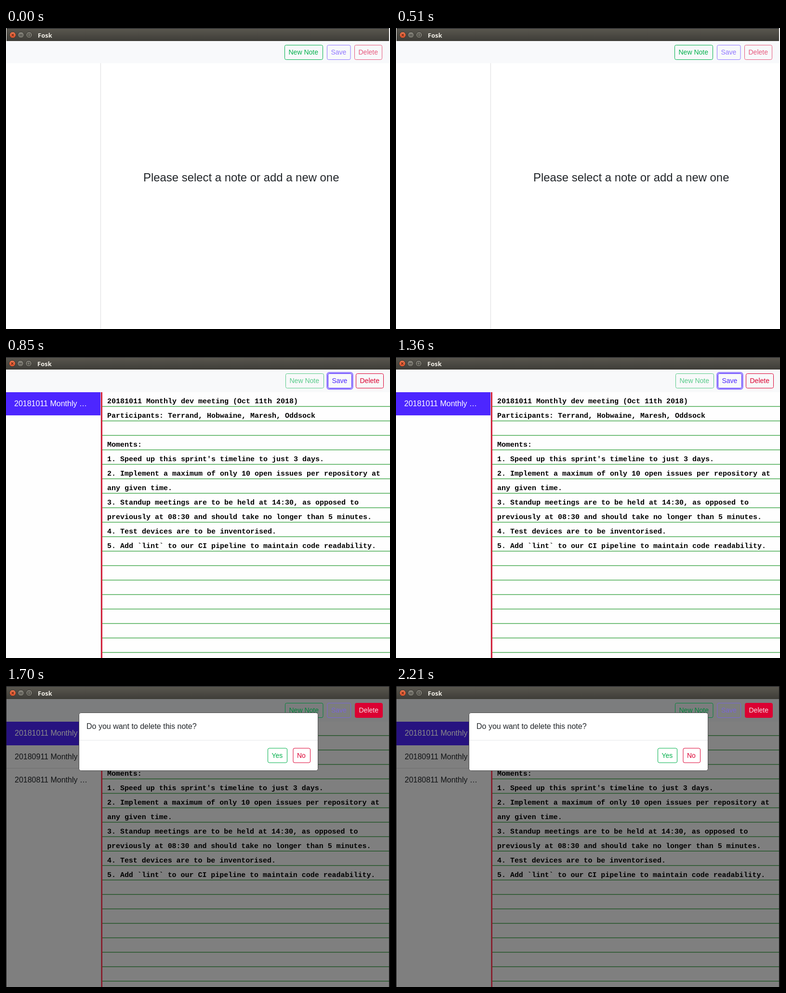
An HTML page for the animation above (2.55 s loop, 797 by 624 pixels).

```html
<!DOCTYPE html>
<html lang="en">
<head>
<meta charset="utf-8">
<title>Notes</title>
<style>
html, body { margin: 0; width: 100%; height: 100%; overflow: hidden; background: #fff; }
svg { display: block; width: 797px; height: 624px; }
text { font-family: "Liberation Sans", Arial, sans-serif; white-space: pre; }
.title { font: bold 13px "Open Sans", "Noto Sans", sans-serif; }
.note { font-family: "Liberation Mono", "Courier New", monospace; font-weight: bold; }
</style>
</head>
<body>
<svg id="stage" viewBox="0 0 797 624">
  <defs>
    <linearGradient id="bar" x2="0" y2="1">
      <stop stop-color="#5b5850"/><stop offset="1" stop-color="#3e3d38"/>
    </linearGradient>
    <linearGradient id="close" x2="0" y2="1">
      <stop stop-color="#f0794f"/><stop offset="1" stop-color="#dc4f29"/>
    </linearGradient>
    <linearGradient id="knob" x2="0" y2="1">
      <stop stop-color="#87857c"/><stop offset="1" stop-color="#6a6860"/>
    </linearGradient>
  </defs>
</svg>
<script>
const GREEN = '#00b04b', PURPLE = '#4d26ff', RED = '#dc0032', INK = '#212529';
const STEP = 850;

const NOTE = [
  '20181011 Monthly dev meeting (Oct 11th 2018)',
  'Participants: Terrand, Hobwaine, Maresh, Oddsock',
  '',
  'Moments:',
  "1. Speed up this sprint's timeline to just 3 days.",
  '2. Implement a maximum of only 10 open issues per repository at',
  'any given time.',
  '3. Standup meetings are to be held at 14:30, as opposed to',
  'previously at 08:30 and should take no longer than 5 minutes.',
  '4. Test devices are to be inventorised.',
  '5. Add `lint` to our CI pipeline to maintain code readability.'
];

const rect = (x, y, w, h, fill, more = '') =>
  `<rect x="${x}" y="${y}" width="${w}" height="${h}" fill="${fill}" ${more}/>`;

const text = (x, y, size, fill, str, cls = '') =>
  `<text x="${x}" y="${y}" font-size="${size}" fill="${fill}" class="${cls}">${str}</text>`;

const button = (x, y, w, label, color, fill = 'none', ink = color, pad = 8.5) =>
  rect(x + .5, y + .5, w - 1, 30, fill, `rx="3" stroke="${color}"`) +
  text(x + pad, y + 20, 14, ink, label);

function titleBar(x, y, right) {
  const cy = y - 12.5;
  const knob = (cx, fill) =>
    `<circle cx="${cx}" cy="${cy}" r="6.5" fill="${fill}" stroke="#33322d"/>`;
  const sign = (d, color) => `<path d="${d}" fill="none" stroke="${color}" stroke-width="1.2"/>`;
  const a = x + 13, b = x + 30, c = x + 47;
  return rect(x, 0, right - x, y, 'url(#bar)') +
    rect(x, 0, right - x, 1.4, '#24262a') +
    rect(x, y - 1, right - x, 1, '#3a3933') +
    knob(a, 'url(#close)') + knob(b, 'url(#knob)') + knob(c, 'url(#knob)') +
    sign(`M${a - 2.3} ${cy - 2.3}l4.6 4.6m0 -4.6l-4.6 4.6`, '#5c2413') +
    sign(`M${b - 3} ${cy}h6`, '#3b3a35') +
    sign(`M${c - 2.5} ${cy - 2.5}h5v5h-5z`, '#3b3a35') +
    text(x + 65, y - 7, 13, '#f1eee6', 'Fosk', 'title');
}

function paper(right, top, gap, size, line, margin, marginX) {
  let out = '';
  for (let i = 0; i < 18; i++)
    out += rect(200, top + i * gap, right - 200, 1.4, line);
  NOTE.forEach((s, i) => out += text(210, top - 5.8 + i * gap, size, '#000', s, 'note'));
  return out + rect(marginX, 73, 200 - marginX, 551, margin);
}

function emptyView() {
  return rect(0, 0, 797, 624, '#fff') +
    rect(1, 27, 794, 46, '#f8f9fb') + titleBar(1, 27, 795) +
    rect(196, 73, 1, 550, '#dcdddf') +
    button(578, 35, 80, 'New Note', GREEN) +
    button(666, 35, 49.5, 'Save', '#8f75ff') +
    button(723, 35, 58, 'Delete', '#e6587c') +
    text(285, 318, 23.9, INK, 'Please select a note or add a new one');
}

function noteView() {
  return rect(0, 0, 797, 624, '#fefefe') +
    rect(0, 26, 797, 47, '#f8f9fa') + titleBar(0, 26, 797) +
    rect(196, 73, 1, 551, '#d9dadc') +
    rect(0, 73, 196, 48, PURPLE) + text(17, 102, 16, '#fff', '20181011 Monthly …') +
    paper(797, 101.8, 30, 15, '#3fa749', '#d3233c', 197) +
    button(580, 34, 80, 'New Note', '#57cb89') +
    rect(666.5, 32.5, 53, 34, 'none', 'rx="4.5" stroke="#a08cff" stroke-width="3"') +
    button(668, 34, 50, 'Save', PURPLE) +
    button(726, 34, 58, 'Delete', RED);
}

function confirmView() {
  return rect(0, 0, 797, 624, '#7f7f7f') +
    rect(1, 27, 794, 47, '#7c7d7e') +
    rect(1, 74, 196, 49, '#271380') + rect(1, 170, 196, 1, '#6e6e6f') +
    rect(197, 74, 1, 550, '#6d6d6e') +
    text(18, 103, 16, '#8a8a8a', '20181011 Monthly …') +
    text(18, 151.5, 16, '#101214', '20180911 Monthly …') +
    text(18, 200, 16, '#101214', '20180811 Monthly …') +
    paper(795, 102, 29.95, 14.96, '#1f5425', '#8a1626', 197.5) +
    button(579, 35, 79.5, 'New Note', '#00843a') +
    button(666.5, 35, 49.5, 'Save', '#7a66d8') +
    button(724, 35, 58, 'Delete', RED, RED, '#f4e6e9') +
    rect(0, 0, 1, 624, '#111') + rect(795, 0, 2, 624, '#111') +
    titleBar(1, 27, 795) +
    rect(151.5, 55.5, 496, 120, '#fff', 'rx="4" stroke="#4a4a4a"') +
    text(167, 88.5, 16, INK, 'Do you want to delete this note?') +
    rect(152, 112, 495, 1, '#e6e8ea') +
    button(543, 128.5, 41, 'Yes', GREEN) +
    button(595.5, 128.5, 36.5, 'No', RED);
}

const stage = document.getElementById('stage');
const views = [emptyView, noteView, confirmView].map(draw => {
  const g = document.createElementNS('http://www.w3.org/2000/svg', 'g');
  g.innerHTML = draw();
  return stage.appendChild(g);
});

const start = performance.now();
function tick() {
  const now = Math.floor((performance.now() - start) / STEP) % views.length;
  views.forEach((g, i) => g.style.display = i === now ? '' : 'none');
  requestAnimationFrame(tick);
}
tick();
</script>
</body>
</html>
```
